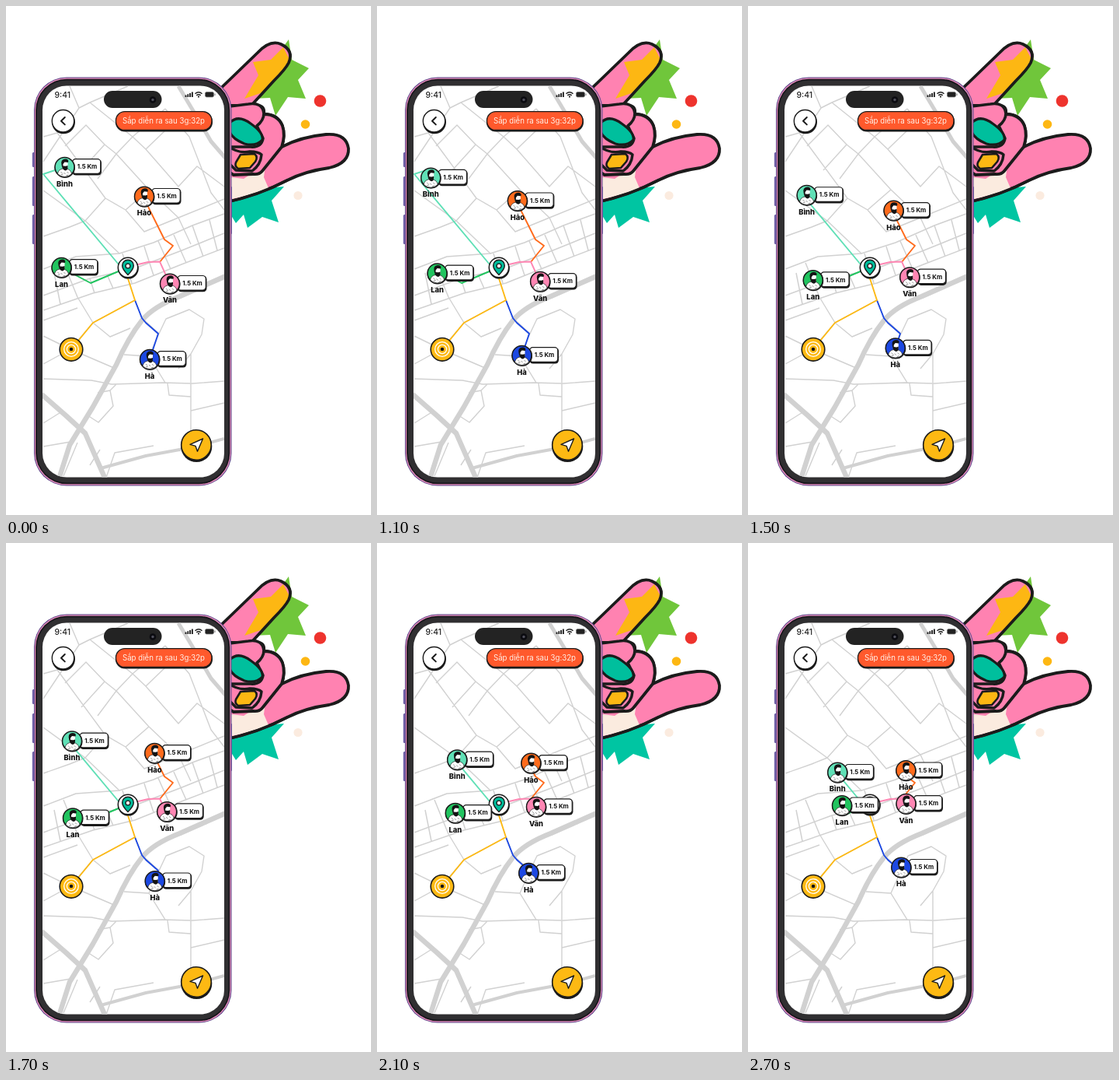
Recreate the animation shown at these times as an HTML page. Size 470x654 px, loop 2.9 s.

```html
<!DOCTYPE html>
<html lang="vi">
<head>
<meta charset="utf-8">
<title>Friends on the way</title>
<style>
html, body { margin: 0; width: 100%; height: 100%; overflow: hidden; background: #fff; }
svg { display: block; width: 470px; height: 654px; font-family: Inter, "Open Sans", sans-serif; }
.ink { stroke: #1b1b1b; stroke-linejoin: round; stroke-linecap: round; }
.name { font-size: 9.4px; font-weight: 800; text-anchor: middle; fill: #111; }
.km { font-size: 7.9px; font-weight: 700; text-anchor: middle; fill: #111; }
</style>
</head>
<body>
<svg viewBox="0 0 470 654" xmlns="http://www.w3.org/2000/svg">
  <defs>
    <clipPath id="screen"><rect x="47" y="102.500" width="234" height="503" rx="31"/></clipPath>
    <clipPath id="upper"><path id="upperShape" d="M270 112L324 60Q340 43 354 49Q371 57 364 73Q360 81 345 96L312 132L282 150Z"/></clipPath>
    <g id="man">
      <path d="M-9 8.500Q-8 3-2.500 2H2Q8 3 9 8.500A12.300 12.300 0 0 1-9 8.500Z" fill="#fff" stroke="#1b1b1b" stroke-width=".7"/>
      <path d="M-3.500-6Q-3.500-9 .5-9Q4-9 4-5V0Q3 3 0 3Q-3 2-3.500-2Z" fill="#fff"/>
      <path d="M-4-3Q-5.500-10 .5-10.500Q6-10.500 4.500-6L0-6.500L-2-4V-1.500L1.500-1.200L4-2Q4.500 4 1 4.500Q-3 4-4-3Z" fill="#141414"/>
      <path d="M-5 6L-3 8M-1 7L1 9M3 6L5 8M-5 10L-2 9M2 11L5 10" stroke="#444" stroke-width=".6" fill="none"/>
    </g>
  </defs>
  <rect width="470" height="654" fill="#fff"/>

  <g id="hand">
    <path fill="#70c63b" d="M364 43L368 69L390 80L376 95L386 119L363 117L347 141L340 118L318 119L331 88Z"/>
    <path fill="#00c5a2" d="M288 238L358 232L342 250L351 278L330 271L311 285L306 268L296 279L288 266Z"/>
    <circle cx="404.500" cy="122" r="7.800" fill="#ee332d"/>
    <circle cx="385.500" cy="152" r="5.800" fill="#fdb713"/>
    <circle cx="376" cy="243.500" r="5.600" fill="#fbebdf"/>
    <use href="#upperShape" fill="#ff82b1"/>
    <path clip-path="url(#upper)" fill="#fdb713" d="M357 53L341 69L318 72L325 89L307 119L334 110L350 113L352 92L369 76Z"/>
    <use href="#upperShape" class="ink" fill="none" stroke-width="3.800"/>
    <path class="ink" stroke-width="3.800" fill="#ff82b1" d="M280 128H322Q334 127 332 139Q350 139 356 154Q360 166 355 181Q380 168 412 165Q438 163 441 183Q442 202 416 208Q386 212 362 224Q326 243 280 253Z"/>
    <path fill="#fbebdf" d="M282 219L306 222L334 204L332 220L338 234Q315 243 282 250Z"/>
    <path class="ink" stroke-width="3.800" fill="#ff82b1" d="M332 139Q350 139 356 154Q360 166 355 181L330 212Q326 217 318 216L293 217Q287 214 282 208L281 140Z"/>
    <path class="ink" stroke-width="3.600" fill="#ff82b1" d="M280 130L312 126Q330 123 332 138Q332 147 323 154L331 170Q329 182 315 181L284 181"/>
    <path class="ink" stroke-width="3.200" fill="#00bf9d" d="M288 150Q299 139 315 151Q332 163 330 172Q322 181 307 177Q292 171 288 162Z"/>
    <path class="ink" stroke-width="3.400" fill="none" d="M286 180Q299 190 314 187Q325 187 329 191Q328 204 317 212L296 211L284 199"/>
    <path class="ink" stroke-width="2.600" fill="#fdb713" d="M302 191L320 190Q325 194 321 200L314 208L299 209Q294 206 296 201Z"/>
    <path class="ink" stroke-width="3.600" fill="none" d="M280 253Q326 243 362 224"/>
  </g>

  <g id="phone">
    <g fill="#7565ab">
      <rect x="33.800" y="188" width="4" height="19" rx="1.500"/>
      <rect x="33.800" y="219" width="4" height="38" rx="1.500"/>
      <rect x="33.800" y="268" width="4" height="38" rx="1.500"/>
      <rect x="288.500" y="232" width="2.500" height="61" rx="1"/>
    </g>
    <rect x="36" y="91.500" width="254.500" height="525" rx="42" fill="#5a4589"/>
    <rect x="37" y="92.500" width="252.500" height="523" rx="41" fill="#eb90bd"/>
    <rect x="38.200" y="93.700" width="250.100" height="520.600" rx="40" fill="#17151c"/>
    <rect x="40" y="95.500" width="246.500" height="517" rx="38" fill="#302f31"/>
    <rect x="47" y="102.500" width="234" height="503" rx="31" fill="#fff"/>
  </g>

  <g clip-path="url(#screen)">
    <g fill="none" stroke="#d1d1d1" stroke-linejoin="round">
      <path stroke-width="1.400" d="M82 103L94 131L48 200M94 131L108 124L157 103M108 124L163 168L205 132M48 168L66 163L128 247M66 163L80 152M76 180L103 153L127 178L97 211M127 178L142 190L118 222M142 190L184 236M163 168L142 190M163 168L180 184L205 160M180 184L222 232L246 206L281 232M205 132L236 168L264 240L281 262M184 236L222 272L281 248M184 236L154 262L128 247L102 276L48 237M102 276L146 318M48 296L82 284L102 276M154 262L178 290L222 272L238 306"/>
      <path stroke-width="1.500" d="M48 372L108 350L166 337L224 315L281 292M48 391L112 369L166 356L226 332L281 311M48 338L90 322L146 318L190 304L240 282L281 267M74 330L92 374M62 343L70 383M108 350L114 369M130 345L138 363M150 318L162 356M178 309L190 346M196 302L212 338M216 294L232 330M240 282L254 322M262 275L272 314"/>
      <path stroke-width="1.400" d="M92 374L112 407L166 378M112 407L83 441L48 424M112 407L134 425L160 414M48 404L92 388M48 460L83 441L139 465M166 378L175 401L197 421L206 402L236 390L255 402L252 422L238 447V484M197 421L184 450L205 484M184 450L152 448M222 466L238 447M48 479L110 481L136 486L202 484L240 485L281 482M238 485V548M208 485L210 500L238 502M238 520L281 510M118 497L134 494L138 514L119 535L105 526M142 486L134 494M48 536L72 521M48 566L83 560M74 604L92 561M129 606L140 574L190 565M108 590L121 570"/>
      <path stroke-width="4" d="M122 594L180 578L240 567L281 556"/>
      <path stroke-width="6.500" d="M283 347L224 373Q190 386 175 404Q158 425 142 461L112 515L82 564L68 608"/>
      <path stroke-width="6.500" d="M46 499L78 527L102 549L128 608"/>
      <path stroke-width="5" d="M222 103L246 143L264 174L283 196"/>
    </g>
    <g id="lines" fill="none" stroke-width="1.900" stroke-linejoin="round"></g>
    <g class="ink" stroke-width="1.600">
      <circle cx="84" cy="441.300" r="14.800" fill="#fdb913"/>
      <g fill="none" style="stroke:#fff" stroke-width="1.300">
        <circle cx="84" cy="441" r="9.300"/>
        <circle cx="84" cy="441" r="5.600"/>
      </g>
      <circle cx="84" cy="441" r="1.500"/>
    </g>
    <circle cx="157.500" cy="337.300" r="13.300" fill="#1b1b1b"/>
    <circle class="ink" cx="157" cy="336" r="12.700" fill="#fff" stroke-width="1.500"/>
    <path class="ink" d="M157 345.500Q149.500 338 149.700 333.500A7.300 7.300 0 0 1 164.300 333.500Q164.500 338 157 345.500Z" fill="#00bd9b" stroke-width="1.400"/>
    <circle class="ink" cx="157" cy="334" r="2.900" fill="#fff" stroke-width="1.300"/>
    <g id="people"></g>
  </g>

  <g id="ui">
    <text x="62.500" y="118.300" font-size="10.400" font-weight="500" fill="#222">9:41</text>
    <rect x="126" y="109" width="74.500" height="22" rx="11" fill="#232323"/>
    <circle cx="189" cy="120.500" r="4.300" fill="#0b0b10"/>
    <circle cx="189" cy="120.500" r="1.700" fill="#50505c"/>
    <path d="M231.500 117V114.500M234.300 117V113.300M237.100 117V112M239.900 117V110.500" stroke="#222" stroke-width="1.900"/>
    <path d="M243.500 112.800Q248 108.600 252.500 112.800M245.300 114.900Q248 112.500 250.700 114.900" stroke="#222" stroke-width="1.500" fill="none"/>
    <circle cx="248" cy="116.600" r="1.100" fill="#222"/>
    <rect x="256.500" y="110.500" width="11" height="6.500" rx="1.800" fill="#222" stroke="#777" stroke-width=".7"/>
    <path d="M269 112.500V115" stroke="#777"/>
    <circle cx="74" cy="149.300" r="15" fill="#1b1b1b"/>
    <circle class="ink" cx="73.500" cy="147.700" r="14.200" fill="#fff" stroke-width="1.400"/>
    <path class="ink" d="M75.800 143L71 147.700L75.800 152.400" fill="none" stroke-width="2"/>
    <rect x="141" y="136.500" width="125" height="25" rx="12" fill="#1b1b1b"/>
    <rect class="ink" x="141.500" y="135.700" width="123.500" height="23.800" rx="11.500" fill="#ff592c" stroke-width="1.300"/>
    <text x="203" y="151.300" font-size="9.700" text-anchor="middle" fill="#fff1e8">Sắp diễn ra sau 3g:32p</text>
    <circle cx="245.300" cy="566" r="20" fill="#1b1b1b"/>
    <circle class="ink" cx="245" cy="564" r="19.300" fill="#fdb913" stroke-width="1.600"/>
    <path class="ink" d="M253.500 556L237 563.300L244 565.300L246.500 572.300Z" fill="#fff" stroke-width="1.400"/>
  </g>
</svg>
<script>
const NS = "http://www.w3.org/2000/svg";
const LOOP = 2900, START = 800, STEP = 100, STEPS = 20;

// Step numbers at which the waypoints in "at" are reached.
const keys = [0, 1, 6, 10, 12, 16, 20];

const people = [
  { name: "Bình", color: "#5fe0b6",
    at: [[75.5, 207], [74.5, 208], [69, 232.3], [85, 254.500], [94.5, 266.8], [110, 287.8], [115.2, 294.8]],
    line: [[75, 207], [48, 216], [145, 332]] },
  { name: "Hảo", color: "#ff6b1c",
    at: [[178, 244.8], [178, 245], [184, 256], [191.3, 270], [195, 276.3], [201, 288.3], [203.3, 292.3]],
    line: [[178, 245], [184, 260], [204, 300], [215, 308], [198, 329]] },
  { name: "Vân", color: "#ff86b3",
    at: [[211, 356.8], [211, 356.6], [209.2, 351.3], [207.2, 345.2], [206, 342], [204.2, 336.8], [203.5, 335]],
    line: [[211, 357], [198, 328.5], [183, 329], [166, 333]] },
  { name: "Hà", color: "#1c48e2",
    at: [[185, 454], [185.1, 453.6], [188, 444.5], [191.7, 434.3], [193.6, 429], [196.5, 420], [197.3, 416.8]],
    line: [[185, 454], [196, 421], [180, 407], [175, 401], [166, 378]] },
  { name: "Lan", color: "#21c45f",
    at: [[71.5, 336], [71.7, 336.2], [82, 349], [86, 353.4], [91, 351.3], [111, 342.3], [121, 337.3]],
    line: [[71, 336], [109, 356], [147, 340]] }
];

function add(parent, tag, attrs, text) {
  const el = document.createElementNS(NS, tag);
  for (const key in attrs) el.setAttribute(key, attrs[key]);
  if (text) el.textContent = text;
  return parent.appendChild(el);
}

// Smooth curve through the waypoints, resting at both ends.
function along(values, k) {
  const last = keys.length - 1;
  const rate = i => (values[i + 1] - values[i]) / (keys[i + 1] - keys[i]);
  const slope = i => {
    if (i === 0 || i === last) return 0;
    const a = keys[i] - keys[i - 1], b = keys[i + 1] - keys[i];
    return (b * rate(i - 1) + a * rate(i)) / (a + b);
  };
  let i = 0;
  while (i < last - 1 && k > keys[i + 1]) i++;
  const h = keys[i + 1] - keys[i], u = (k - keys[i]) / h, v = 1 - u;
  return v * v * (1 + 2 * u) * values[i] + u * u * (3 - 2 * u) * values[i + 1]
    + h * u * v * (v * slope(i) - u * slope(i + 1));
}

// The part of a route still ahead of a point.
function ahead(route, [x, y]) {
  let best = Infinity, rest = route;
  for (let i = 0; i < route.length - 1; i++) {
    const [ax, ay] = route[i], dx = route[i + 1][0] - ax, dy = route[i + 1][1] - ay;
    const u = Math.max(0, Math.min(1, ((x - ax) * dx + (y - ay) * dy) / (dx * dx + dy * dy)));
    const px = ax + u * dx, py = ay + u * dy, d = Math.hypot(px - x, py - y);
    if (d < best) {
      best = d;
      rest = [[px, py], ...route.slice(i + 1)];
    }
  }
  return rest.join(" ");
}

const lines = document.getElementById("lines");
const crowd = document.getElementById("people");

for (const p of people) {
  p.path = add(lines, "polyline", { stroke: p.color });
  p.node = add(crowd, "g", {});
  add(p.node, "rect", { x: 10, y: -10, width: 37.5, height: 20.5, rx: 4.5, fill: "#1b1b1b" });
  add(p.node, "rect", { class: "ink", x: 10, y: -10.3, width: 36.3, height: 18.6, rx: 4, fill: "#fff", "stroke-width": 1.2 });
  add(p.node, "text", { class: "km", x: 29, y: 2.3 }, "1.5 Km");
  add(p.node, "circle", { cx: 0.3, cy: 0.7, r: 13.2, fill: "#1b1b1b" });
  add(p.node, "circle", { class: "ink", r: 12.5, fill: p.color, "stroke-width": 1.5 });
  add(p.node, "use", { href: "#man" });
  add(p.node, "text", { class: "name", x: 0, y: 24.7 }, p.name);
}
add(lines, "polyline", { stroke: "#fdb913", points: "84,441 112,407 166,378 156,347" });

function draw(time) {
  const t = time % LOOP;
  const k = Math.max(0, Math.min(STEPS, Math.floor((t - START) / STEP) + 1));
  for (const p of people) {
    const pos = [0, 1].map(axis => along(p.at.map(point => point[axis]), k));
    p.node.setAttribute("transform", `translate(${pos})`);
    p.path.setAttribute("points", ahead(p.line, pos));
  }
}

const begin = performance.now();
function tick() {
  draw(performance.now() - begin);
  requestAnimationFrame(tick);
}
tick();
</script>
</body>
</html>
```
